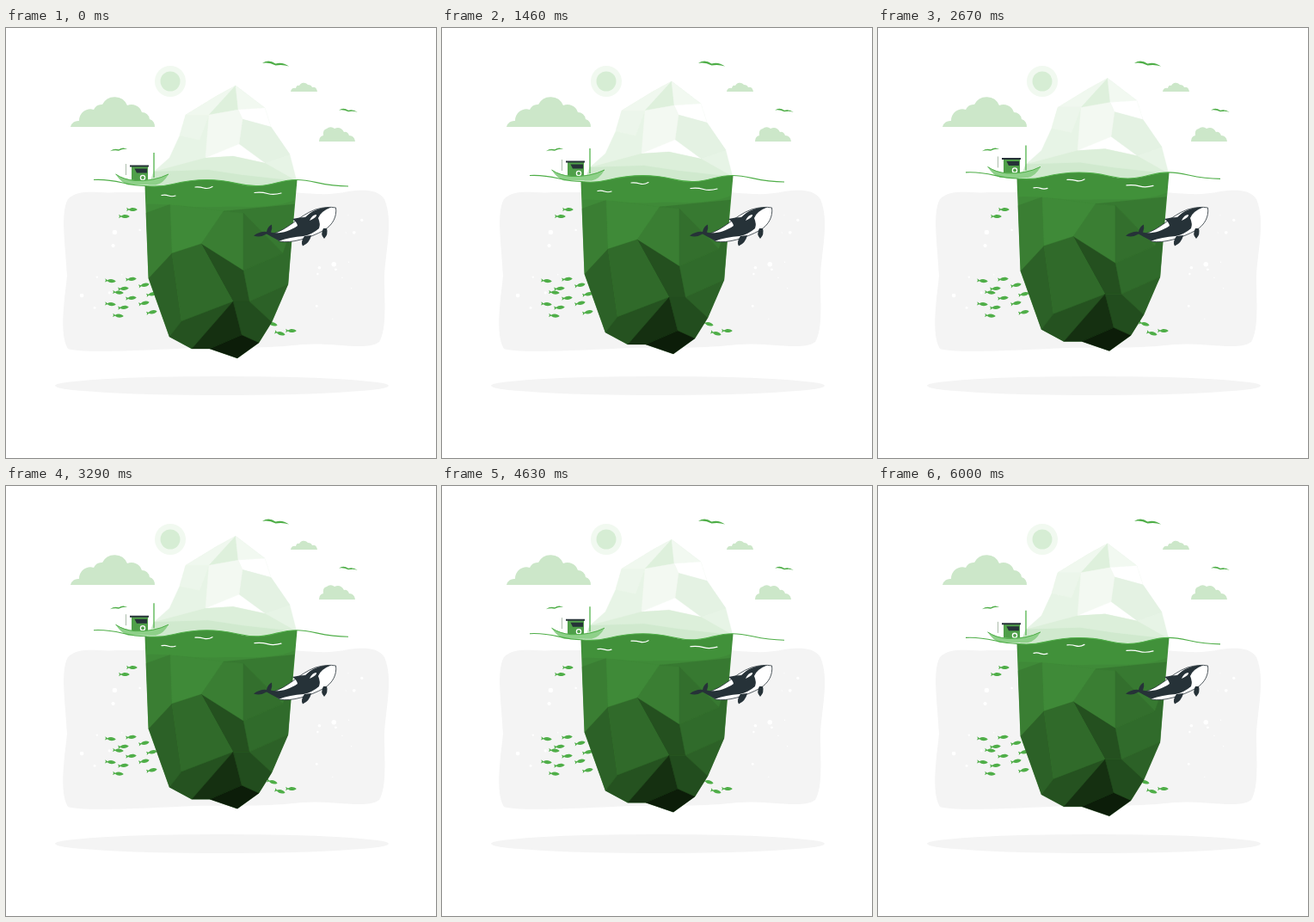
An HTML page that plays this animation: 500 by 500 pixels, repeating every 6040 ms.

```html
<!DOCTYPE html>
<html lang="en">
<head>
<meta charset="utf-8">
<title>Iceberg</title>
<style>
html, body { margin: 0; width: 100%; height: 100%; overflow: hidden; background: #fff; }
svg { display: block; width: 100vw; height: 100vh; }
</style>
</head>
<body>
<svg viewBox="0 0 500 500">
  <defs>
    <path id="fish" d="M7 0C4-3-1-3-4-.6L-7-2.4-6.2 0-7 2.4-4 .6C-1 3 4 3 7 0Z"/>
    <path id="bird" d="M-15.500 0Q-8-5 0 .5Q8-2 15.500 3.500Q8 1 0 2.500Q-8-1.500-15.500 0Z"/>
  </defs>

  <g fill="#f4f4f4">
    <path d="M72 199C86 186 105 193 130 191L335 191C365 194 380 194 398 190C415 188 432 187 440 199C451 225 441 260 440 290C440 320 443 350 434 365C420 376 380 365 345 368C300 373 270 371 220 372C170 374 90 379 72 373C61 355 69 310 71 288C69 250 63 215 72 199Z"/>
    <ellipse cx="251" cy="416" rx="194" ry="11"/>
  </g>
  <g id="bubbles" fill="#fff"></g>

  <circle cx="191" cy="62" r="18" fill="#f1f9f0"/>
  <circle cx="191" cy="62" r="11.500" fill="#d6edd4"/>

  <g fill="#cce7c9">
    <path d="M75 115A9 9 0 0 1 85 108A13 13 0 0 1 102 95A10 10 0 0 1 112 89A16 16 0 0 1 141 90A13 13 0 0 1 158 98A9 9 0 0 1 167 106Q173 108 173 115Z"/>
    <path d="M331 74Q332 69 337 70Q338 66 341 67A6 6 0 0 1 351 66Q355 66 356 69Q361 68 362 74Z"/>
    <path d="M364 132Q364 126 369 125Q368 118 373 117A7 7 0 0 1 382 117Q389 114 393 121Q397 120 399 125Q405 125 406 132Z"/>
  </g>

  <g fill="#4fae48">
    <use href="#bird" transform="translate(313.500 41)"/>
    <use href="#bird" transform="translate(398 95.500) scale(.7)"/>
    <use href="#bird" transform="translate(131 141) scale(-.65 .65)"/>
    <g id="shoal"></g>
  </g>

  <g id="float">
    <g id="tip"></g>
    <path fill="#3f8a38" d="M161.500 183.500Q178 185.500 194 181.500C215 176.500 233 175.500 250 177.500C270 179.500 275 184.500 294 183.500C312 182.500 320 176.500 338.500 176.500L328 298 309 342 294 366 269 384 237 373 216 373 190 359 165.500 291Z"/>
    <g id="base"></g>
    <path fill="#4aa342" fill-opacity=".25" d="M162 184Q178 186 194 182C215 177 233 176 250 178C270 180 275 185 294 184C312 183 320 177 338 177L336 200C310 211 275 207 250 208C215 210 185 203 163 205Z"/>
    <path fill="none" stroke="#fff" stroke-width="1.200" stroke-linecap="round" d="M181 194.500Q185 193.500 189 195T197 195M220 185Q225 184.500 230 186T240 184.500M289 191.500Q297 190.500 304 192.500T320 192"/>

    <path fill="none" stroke="#5a7a58" stroke-width=".5" d="M139.500 158V171"/>
    <path fill="none" stroke="#5fb959" stroke-width="1.400" d="M172 145V174"/>
    <path fill="#4f9f49" d="M146 161H165V178H146Z"/>
    <path fill="#263238" d="M144 159.500H166V161.500H144ZM149.500 163.500H164V168.500H152Z"/>
    <circle cx="159" cy="174" r="2.600" fill="none" stroke="#fff" stroke-width="1.300"/>
    <path fill="#8ed089" d="M127.500 170Q137 176 150 177Q172 178 189 170Q183 181 174 182.500H142Q134 180 127.500 170Z"/>
    <path fill="none" stroke="#4fae48" d="M127.500 170Q137 176.500 150 177.500Q172 178.500 189 170"/>
    <path fill="none" stroke="#4fae48" stroke-width="1.100" d="M102 176.500C130 175 138 183.500 162 183.500Q178 185.500 194 181.500C215 176.500 233 175.500 250 177.500C270 179.500 275 184.500 294 183.500C312 182.500 320 176.500 338 176.500C358 176.500 367 184 398 184"/>
  </g>

  <g fill="#263238">
    <path fill="#fff" stroke="#263238" stroke-width=".8" d="M308 240C330 234 340 218 360 211Q374 207 383.500 209C385 219 380 229 370 235C354 244 331 251 318 248Z"/>
    <path d="M288 241.500Q296 236 303 237Q304 231 309 228.500Q310 233 308 237.500C316 240 329 237 339 230Q338 225 333 222Q342 220 348 220C356 212 366 208 378 208.500Q366 213 363 221Q366 228 364 233Q356 240 346 242Q330 243 318 247.500Q309 243 303 239.500Q296 244 288 241.500Z"/>
    <path d="M347 242Q342 249 345 253.500Q353 250 355 241ZM369 233Q365 240 370 245Q375 240 373 233Z"/>
    <path fill="#fff" d="M353 224Q356 217 361 217Q362 220 353 224Z"/>
  </g>
</svg>
<script>
const get = id => document.getElementById(id);
const fill = (id, items, shape) => get(id).innerHTML = items.map(shape).join("");

// Corners are lettered from a; each facet names its corners and its brightness in percent.
function facets(id, light, dark, corners, list) {
  const points = corners.split(" ");
  const corner = letter => points[letter.charCodeAt(0) - 97];
  fill(id, list.split(" "), facet => {
    const [letters, tone] = facet.split(":");
    const color = `color-mix(in srgb, ${light} ${tone}%, ${dark})`;
    return `<polygon style="fill:${color};stroke:${color};stroke-width:.3"
      points="${[...letters].map(corner).join(" ")}"/>`;
  });
}

facets("tip", "#fff", "#c3e3c0",
  "267,67 301,93 308,115 330,147 338,178 338,184 165,185 172,167 190,151 202,125 209,101 " +
  "245,79 236,101 270,95 275,106 271,135 232,151 301,157 264,149 225,130 235,165 275,171",
  "abcdefghijkl:60 alkm:75 amn:45 anb:78 nbco:100 kmtj:68 ocdrp:55 mnopq:80 prsq:100 hqsrefg:42 huvefg:22");

facets("base", "#3f8a38", "#091606",
  "163,215 191,205 253,213 335,205 333,230 276,215 322,262 328,298 276,282 283,318 264,318 " +
  "227,251 193,262 166,291 204,341 190,359 216,373 237,373 274,357 294,366 309,342 269,384",
  "abmn:90 bclm:100 cfil:90 cdegf:85 fgi:77 gehji:73 lijk:50 nmop:65 mlko:72 pokq:52 jhu:65 kjuts:47 kqrs:22 rstv:6");

// Each column of fish zigzags downwards.
const columns = [
  { x: 142, y: 211, step: 8, count: 2, side: 1, turn: 0 },
  { x: 126, y: 294, step: 13.5, count: 4, side: -1, turn: 5 },
  { x: 141, y: 292, step: 11, count: 4, side: 1, turn: -6 },
  { x: 165, y: 299, step: 10.5, count: 4, side: -1, turn: -12 },
  { x: 314, y: 344, step: 11, count: 2, side: -1, turn: 15 },
  { x: 327, y: 352, step: 0, count: 1, side: 1, turn: 0 }
];
fill("shoal", columns, ({ x, y, step, count, side, turn }) =>
  Array.from({ length: count }, (_, i) => {
    const shift = side * (i % 2 ? -4.5 : 4.5);
    return `<use href="#fish" transform="translate(${x + shift} ${y + i * step}) rotate(${turn}) scale(.9)"/>`;
  }).join(""));

const random = seed => Math.abs(Math.sin(seed * 127.1) * 43758.5) % 1;
fill("bubbles", [...Array(22).keys()], i => {
  const x = (i % 3 ? 345 : 82) + 75 * random(i + 1);
  const y = 210 + 145 * random(i + 41);
  return `<circle cx="${x}" cy="${y}" r="${0.6 + 2.2 * random(i + 81) ** 2}"/>`;
});

const LOOP = 6040, RISE = 9.5;
const float = get("float");

function draw(now) {
  const u = 1 - Math.abs(1 - 2 * (now % LOOP) / LOOP);
  const lift = RISE * (0.8 * u + 0.2 * Math.sin(u * Math.PI / 2));
  float.setAttribute("transform", `translate(0 ${-lift})`);
  requestAnimationFrame(draw);
}
draw(0);
</script>
</body>
</html>
```
